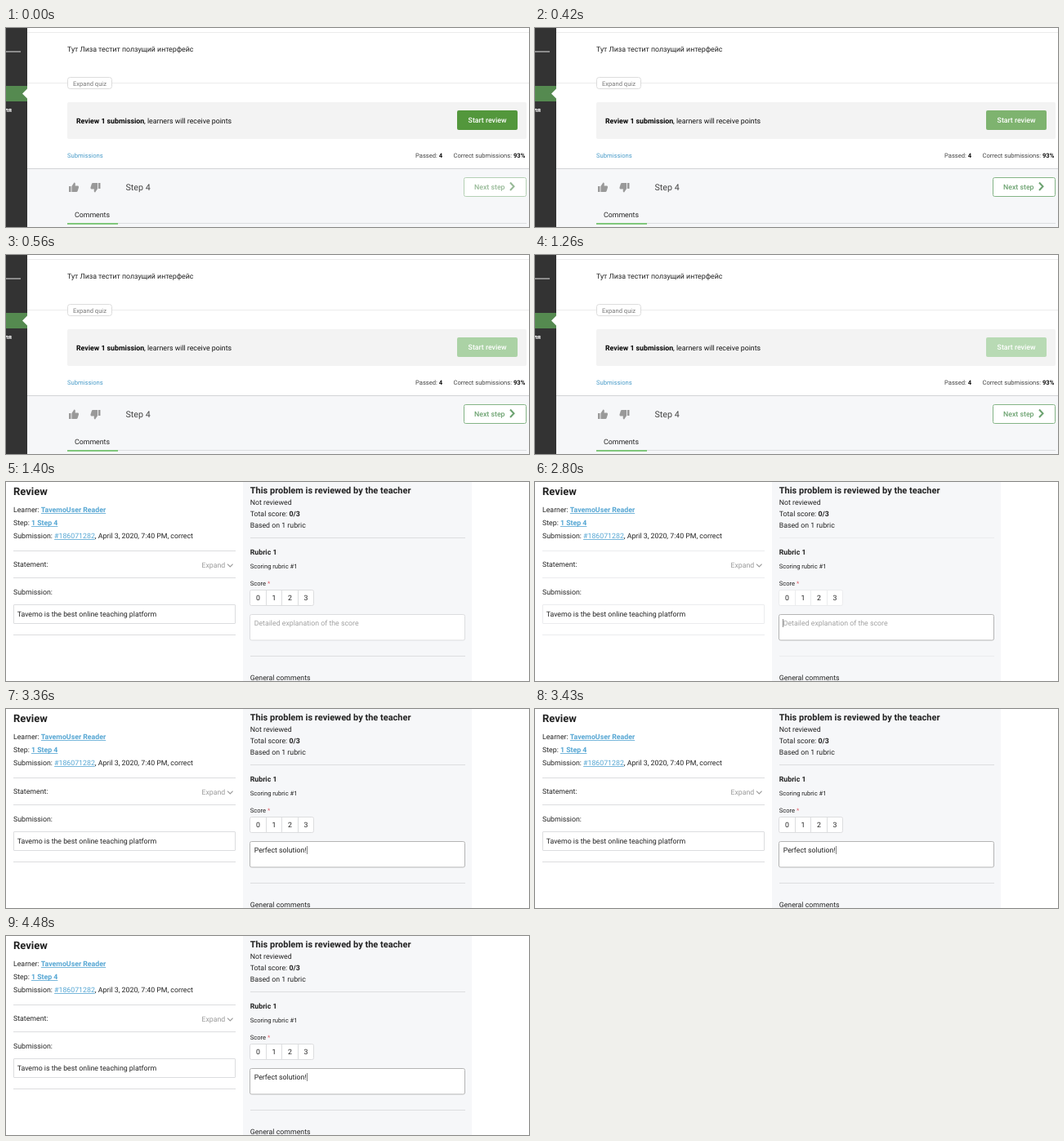
These frames come from a looping animation (640x244 px, 4760 ms). An HTML page with a canvas:

```html
<!DOCTYPE html>
<html lang="en">
<head>
<meta charset="utf-8">
<title>Submission review</title>
<style>
  html, body { margin: 0; width: 100%; height: 100%; overflow: hidden; background: #fff; }
  canvas { display: block; width: 640px; height: 244px; }
</style>
</head>
<body>
<canvas id="stage"></canvas>
<script>
const LOOP = 4760, TICK = 70;
const W = 640, H = 244;
const BASE = 8.78, SMALL = 7.6;
const INK = '#222', LINK = '#55a6d3', PANEL = '#f6f7f9';

const canvas = document.getElementById('stage');
const dpr = window.devicePixelRatio || 1;
canvas.width = W * dpr;
canvas.height = H * dpr;
const ctx = canvas.getContext('2d');

const clamp = v => Math.max(0, Math.min(1, v));
const mix = (a, b, k) =>
  `rgb(${a.map((v, i) => Math.round(v + (b[i] - v) * k)).join(',')})`;

function fill(x, y, w, h, color) {
  ctx.fillStyle = color;
  ctx.fillRect(x, y, w, h);
}

function hline(x0, x1, y, color) {
  fill(x0, y, x1 - x0, 1, color);
}

// Rounded box whose 1px border lies inside the given edges
function box(x, y, w, h, r, bg, border) {
  ctx.beginPath();
  ctx.roundRect(x + 0.5, y + 0.5, w - 1, h - 1, r);
  ctx.fillStyle = bg;
  ctx.fill();
  ctx.strokeStyle = border;
  ctx.lineWidth = 1;
  ctx.stroke();
}

// Draws text and returns the x where it ends
function text(str, x, y, { size = BASE, weight = 400, color = INK, align = 'left', line = false } = {}) {
  ctx.font = `${weight} ${size}px Roboto, sans-serif`;
  ctx.textAlign = align;
  ctx.fillStyle = color;
  ctx.fillText(str, x, y);
  const w = ctx.measureText(str).width;
  if (line) ctx.fillRect(x, Math.round(y + 1), w, 0.8);
  return x + w;
}

function polyline(points, color, width) {
  ctx.beginPath();
  points.forEach(([x, y]) => ctx.lineTo(x, y));
  ctx.strokeStyle = color;
  ctx.lineWidth = width;
  ctx.stroke();
}

function thumb(cx, cy, flip) {
  ctx.save();
  ctx.translate(cx, cy);
  ctx.scale(flip, flip);
  fill(-6, -1.5, 2.5, 7, '#999');
  ctx.beginPath();
  ctx.moveTo(-2.6, -1.5);
  ctx.lineTo(0.4, -6);
  ctx.quadraticCurveTo(2.4, -6, 1.6, -2);
  ctx.lineTo(5, -2);
  ctx.quadraticCurveTo(6.2, -1.8, 6, 0);
  ctx.lineTo(4.6, 4.6);
  ctx.quadraticCurveTo(4.2, 5.5, 3.2, 5.5);
  ctx.lineTo(-2.6, 5.5);
  ctx.fill();
  ctx.restore();
}

function drawSidebar() {
  fill(0, 0, 26, H, '#333');
  fill(0, 28, 18, 2, '#8c8c8c');
  fill(0, 71, 26, 19, '#558a50');
  ctx.beginPath();
  ctx.moveTo(20, 80.5);
  ctx.lineTo(26, 74.5);
  ctx.lineTo(26, 86.5);
  ctx.fillStyle = '#fff';
  ctx.fill();
  text('ля', -1.5, 103, { size: 7.6, weight: 700, color: '#fff' });
}

function drawLesson(t) {
  const press = 1 - Math.pow(1 - clamp((t - 350) / 420), 3);
  const settle = clamp(t / 280);

  fill(26, 173, W - 26, H - 173, PANEL);
  drawSidebar();
  hline(26, W, 5, '#ececec');
  text('Тут Лиза тестит ползущий интерфейс', 75, 28.6);

  hline(26, W, 67, '#ececec');
  box(75, 60, 55, 15, 3, '#fff', '#dcdcdc');
  text('Expand quiz', 82, 70.7, { size: SMALL, color: '#777' });

  ctx.beginPath();
  ctx.roundRect(75, 91, 562, 45, 2);
  ctx.fillStyle = '#f3f3f3';
  ctx.fill();
  const end = text('Review 1 submission', 86, 116.6, { weight: 700, color: '#000' });
  text(', learners will receive points', end, 116.6, { color: '#111' });

  ctx.beginPath();
  ctx.roundRect(552, 101, 74, 24, 2);
  ctx.fillStyle = mix([83, 151, 60], [184, 218, 180], press);
  ctx.fill();
  text('Start review', 589, 116.2, { weight: 500, color: '#fff', align: 'center' });

  text('Submissions', 75, 158.5, { size: SMALL, color: '#4a9cc9' });
  const small = { size: SMALL, color: '#444' };
  const strong = { size: SMALL, weight: 700, color: '#111' };
  text('4', text('Passed: ', 501, 158.5, small), 158.5, strong);
  text('93%', text('Correct submissions: ', 547.5, 158.5, small), 158.5, strong);

  hline(26, W, 172, '#d2d4d6');
  thumb(83, 195.5, 1);
  thumb(109.5, 195.5, -1);
  text('Step 4', 146.5, 199, { size: 10.7, color: '#444' });

  const green = mix([150, 185, 150], [108, 162, 112], settle);
  box(560, 183, 77, 24, 2, '#fff', mix([180, 208, 180], [132, 180, 134], settle));
  text('Next step', 573, 198, { weight: 500, color: green });
  polyline([[617, 189.5], [621.5, 194.3], [617, 199]], green, 2);

  text('Comments', 84, 232);
  hline(137, 637, 239, '#dcdee0');
  fill(75, 239, 62, 2, '#80c77b');
}

function drawSubmission(rule) {
  text('Review', 9, 15.5, { size: 13, weight: 700 });
  const bold = { weight: 700, color: LINK, line: true };
  text('TavemoUser Reader', text('Learner: ', 9, 37), 37, bold);
  text('1 Step 4', text('Step: ', 9, 53.2), 53.2, bold);
  const end = text('#186071282', text('Submission: ', 9, 69.2), 69.2, { color: LINK, line: true });
  text(', April 3, 2020, 7:40 PM, correct', end, 69.2);

  [84, 117, 187].forEach(y => hline(9, 281, y, rule));
  text('Statement:', 9, 104.4);
  text('Expand', 239.5, 104.8, { color: '#999' });
  polyline([[271, 100.7], [274.3, 104], [277.6, 100.7]], '#999', 1.1);

  text('Submission:', 9, 137.8);
  box(9, 150, 272, 24, 0.5, '#fff', rule);
  text('Tavemo is the best online teaching platform', 13.7, 164.8);
}

function drawRubric(t, rule) {
  const focused = t >= 2660, filled = t >= 3360;
  fill(290, 0, 280, H, PANEL);
  text('This problem is reviewed by the teacher', 298.7, 13.5, { size: 11, weight: 700 });
  text('Not reviewed', 298.7, 28.4);
  text('0/3', text('Total score: ', 298.7, 42.4), 42.4, { weight: 700 });
  text('Based on 1 rubric', 298.7, 56.2);
  [68, 213].forEach(y => hline(299, 562, y, rule));

  text('Rubric 1', 298.7, 89.2, { weight: 700 });
  text('Scoring rubric #1', 298.7, 105.5, { size: SMALL });
  const end = text('Score ', 298.7, 126.6, { size: SMALL });
  text('*', end, 126.6, { size: SMALL, color: '#e0606a' });

  box(298, 132, 79, 20, 2, '#fff', rule);
  for (let i = 0; i < 4; i++) {
    const x = 308.5 + i * 19.5;
    if (i) fill(Math.floor(x - 10), 132, 1, 20, rule);
    text(String(i), x, 145.3, { align: 'center' });
  }

  box(298, 162, 264, 32.5, 2, '#fff', focused ? '#b4b4b4' : rule);
  let caretX = 303;
  if (filled) caretX = text('Perfect solution!', 303.7, 176);
  else text('Detailed explanation of the score', 303.7, 176, { color: '#a0a0a0' });

  const caretOff = (t >= 3220 && t < 3360) || (t >= 3990 && t < 4480);
  if (focused && !caretOff) fill(Math.round(caretX), 168, 1, 10, '#888');

  text('General comments', 298.7, 243);
}

function draw(t) {
  ctx.setTransform(dpr, 0, 0, dpr, 0, 0);
  ctx.textRendering = 'geometricPrecision';
  fill(0, 0, W, H, '#fff');
  if (t < 1400) {
    drawLesson(t);
  } else {
    const rule = t >= 2660 && t < 3360 ? '#ebecee' : '#dcdddf';
    drawSubmission(rule);
    drawRubric(t, rule);
  }
}

function loop() {
  const t = performance.now() % LOOP;
  draw(Math.floor(t / TICK) * TICK);
  requestAnimationFrame(loop);
}
loop();
</script>
</body>
</html>
```
